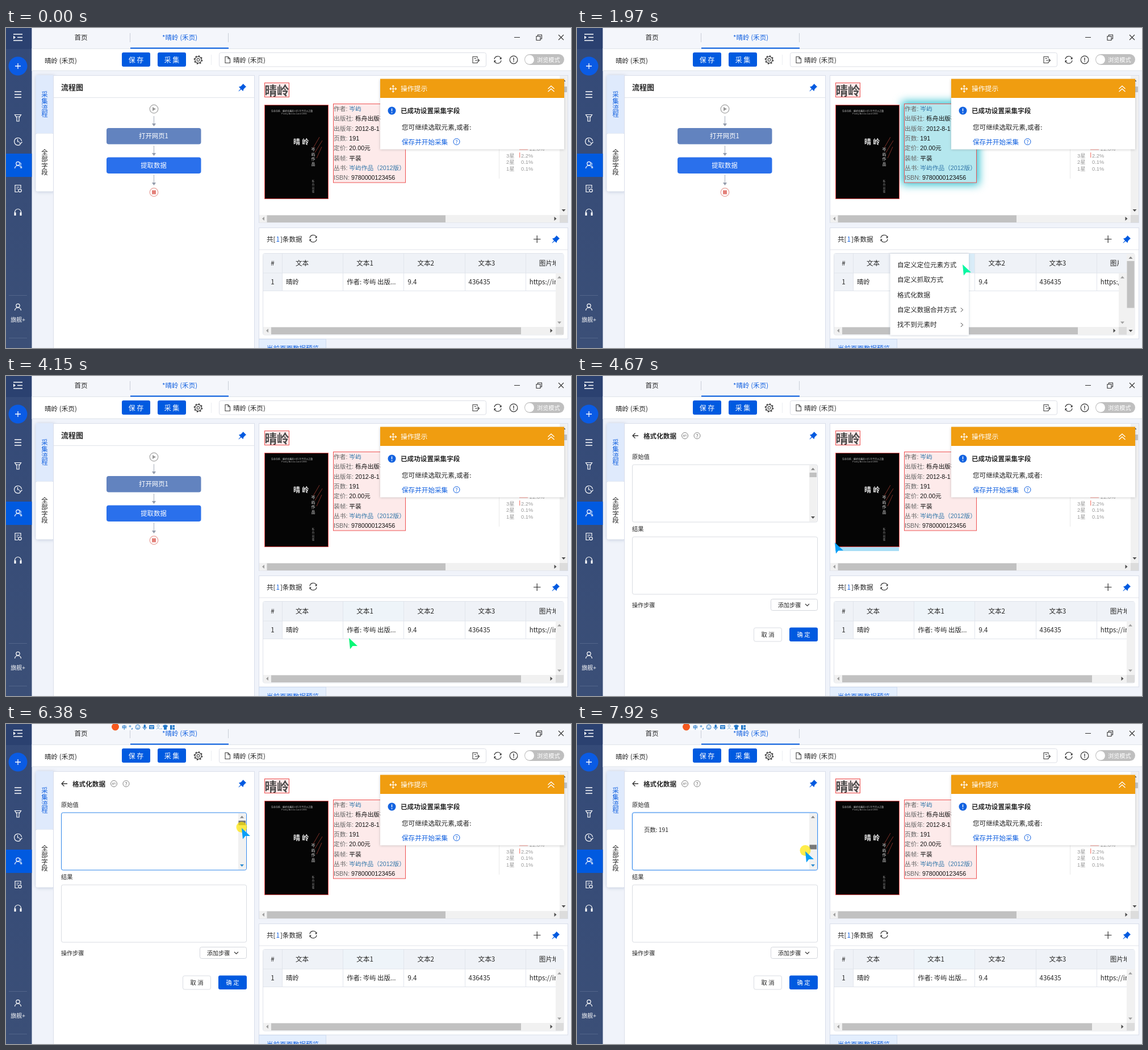
Recreate the animation shown at these times as an HTML page. Size 995 by 563 pixels, loop 8 s.

```html
<!DOCTYPE html>
<html lang="zh">
<head>
<meta charset="utf-8">
<title>流程演示</title>
<style>
html, body { margin: 0; width: 100%; height: 100%; overflow: hidden; background: #f0f3fa; }
svg { display: block; }
text { font-family: "Noto Sans CJK SC", "Noto Sans CJK", sans-serif; white-space: pre; }
.page text { font-family: "Liberation Sans", "Noto Sans CJK SC", "Noto Sans CJK", sans-serif; }
</style>
</head>
<body>
<svg id="stage" width="995" height="563" viewBox="0 0 995 563"></svg>
<script>
const LOOP = 8000, BLUE = '#005ae0', INK = '#262626', LINE = '#dcdfe6';
const BOOK = '晴岭', SITE = '禾页', AUTHOR = '岑屿';
const NAME = `${BOOK} (${SITE})`;

// Drawing helpers
const rect = (x, y, w, h, fill, more = '') => `<rect x="${x}" y="${y}" width="${w}" height="${h}" fill="${fill}" ${more}/>`;
const text = (x, y, str, size = 11.6, fill = INK, more = '') => `<text x="${x}" y="${y}" font-size="${size}" fill="${fill}" ${more}>${str}</text>`;
const line = (d, color, width = 1, more = '') => `<path d="${d}" fill="none" stroke="${color}" stroke-width="${width}" ${more}/>`;
const shape = (d, fill) => `<path d="${d}" fill="${fill}"/>`;
const circle = (x, y, r, fill, more = '') => `<circle cx="${x}" cy="${y}" r="${r}" fill="${fill}" ${more}/>`;
const ring = (x, y, r, color, width = 1.2, more = '') => circle(x, y, r, 'none', `stroke="${color}" stroke-width="${width}" ${more}`);
const group = (id, body, more = '') => `<g id="${id}" ${more}>${body}</g>`;
const at = (x, y, body) => `<g transform="translate(${x} ${y})">${body}</g>`;
const outline = (color, r = 0) => `stroke="${color}" rx="${r}"`;
const CENTER = 'text-anchor="middle"', BOLD = 'font-weight="700"';

const triangles = { up: 'M-3.5 2 0-2 3.5 2Z', down: 'M-3.5-2 0 2 3.5-2Z', left: 'M2-3.5-2 0 2 3.5Z', right: 'M-2-3.5 2 0-2 3.5Z' };
const tri = (x, y, dir, color = '#505050') => at(x, y, shape(triangles[dir], color));
const pin = (x, y) => at(x, y, shape('M1.500-7 7-1.500 5.500-.5 2.500 2.500 1.500 6-2 3-6 6.500-6.500 6-3 2-6-1.500-2.500-2.500.5-5.500Z', BLUE));
const refresh = (x, y, c = '#333') => at(x, y, line('M-6-1A6 6 0 0 1 5.500-2.500M6 1A6 6 0 0 1-5.500 2.500', c, 1.2) + shape('M6.500-5V-1H3ZM-6.500 5V1H-3Z', c));
const gear = (x, y) => at(x, y, ring(0, 0, 5.6, '#444', 1.2) + ring(0, 0, 6.9, '#444', 1.8, 'stroke-dasharray="2.710"') + ring(0, 0, 2.4, '#444', 1.1));
const user = (x, y) => at(x, y, ring(0, -2.5, 3.2, '#fff') + line('M-5.5 6C-5 2-3 1 0 1S5 2 5.5 6', '#fff', 1.2));
const flowArrow = (y, h) => line(`M260.5 ${y}V${y + h - 5}`, '#a9b0bb') + shape(`M257 ${y + h - 5}H264L260.5 ${y + h}Z`, '#949cab');

function sidebar() {
  const w = '#fff';
  return rect(0, 0, 45.5, 563, 'url(#side)') + rect(0, 0, 45.5, 37, '#2b4170') +
    line('M13 11H29M20 16.5H29M13 22H29', w, 1.6) + shape('M13 13.5 17 16.5 13 19.5Z', w) +
    circle(21, 67, 16.5, '#0a5be4') + line('M16 67H26M21 62V72', w, 1.3) +
    line('M15 112H27M15 117H27M15 122H27', w, 1.3) +
    line('M15.5 152.5H26.5L23 158V164H19V158ZM17 156H25', w, 1.2) +
    line('M25.500 204.500A6.500 6.500 0 1 1 27.500 199', w, 1.2) + line('M20.500 195.500V200H23.500M23.500 201.500 25.500 203.500 28.500 200.500', w, 1.2) +
    rect(0, 221, 45.5, 41, BLUE) + user(21, 241) + line('M25 236.5Q28 239 25.5 241.5Q27.5 243 28 246.5', w) +
    line('M26 282V276.500H16V288.500H21M18.500 280H23.500M18.500 283H21', w, 1.2) + ring(24.5, 286, 2.7, w) +
    line('M15.500 326V324A5.500 5.500 0 0 1 26.500 324V326', w, 1.2) + rect(14.5, 324.5, 3, 5.5, w) + rect(24.5, 324.5, 3, 5.5, w) +
    line('M5 470.5H37M5 545.5H37', '#52658a') + user(21, 491) + text(21, 517, '旗舰+', 10, w, CENTER);
}

function topBars() {
  const button = (x, label) => rect(x, 43, 50, 25, BLUE, 'rx="3"') + text(x + 25, 60.5, label, 12, '#fff', CENTER);
  return rect(45.5, 0, 950, 37, '#f4f6fb') + rect(45.5, 37, 950, 38, '#fff') +
    line('M45 36.5H995M45 75H995', '#dfe3ea') + line('M218.5 9V25M391.5 9V25', '#c9ced8') +
    rect(219, 34.5, 173, 2, BLUE) +
    text(132, 21, '首页', 11.6, INK, CENTER) + text(275, 21, '*' + NAME, 11.6, '#1261e0') +
    line('M895 16.500H905M934 14.500H941V21.500H934ZM936.500 14V12H943.500V19H941M973 12 982 21M982 12 973 21', '#333', 1.1) +
    text(68, 62, NAME) + button(204, '保 存') + button(267, '采 集') + gear(338.5, 56) +
    line('M361.500 47V65', '#eceef2') + rect(375.5, 43.5, 470, 24.5, '#fff', outline(LINE, 3)) +
    line('M386 50.500H391L394.500 54V61.500H386ZM391 50.500V54H394.500', '#444', 1.1) + text(400, 60.5, NAME) +
    line('M830 53V50.500H822V61.500H830V60M824.500 53.500H828M826 57H833M830.500 54 833.500 57 830.500 60', '#444', 1.1) +
    refresh(866, 56) + ring(894, 56, 6.8, '#333') + line('M894 52V57.500M894 58.500V60', '#333', 1.3) +
    rect(913, 46, 70, 19, '#bfbfbf', 'rx="9.500"') + circle(922, 55.5, 8, '#fff') + text(935, 59.5, '浏览模式', 10.2, '#fff');
}

function leftPanel() {
  const vertical = (str, y, c) => [...str].map((ch, i) => text(68, y + i * 11.8, ch, 11.4, c, CENTER)).join('');
  const node = (y, label, c) => rect(177, y, 166.5, 28.5, c, 'rx="4"') + text(260, y + 18.2, label, 11.4, '#fff', CENTER);
  const box = (y, id) => rect(97.5, y, 326, 101, '#fff', `id="${id}" ` + outline('#d9dce2', 3));
  const flow = text(97, 108.5, '流程图', 13, INK, BOLD) + line('M84 122.5H437', '#e1e4ea') +
    ring(260.5, 142.5, 7.3, '#a6a6a6') + shape('M258 139V146L264 142.5Z', '#999') + flowArrow(155, 18) +
    node(176, '打开网页1', '#6283bf') + flowArrow(207, 18) + node(227.5, '提取数据', '#2a70ec') + flowArrow(258, 19) +
    ring(260.5, 289, 7.3, '#e7a09a') + rect(257, 285.5, 7, 7, '#e3817a');
  const format = line('M108 105H98M102.500 100.500 98 105 102.500 109.500', '#333', 1.3) + text(117, 109.5, '格式化数据', 11.6, INK, BOLD) +
    ring(190, 105, 5.5, '#777', 0.9) + text(190, 107, 'API', 4.5, '#666', CENTER) + ring(211.5, 105, 5.5, '#777', 0.9) + text(211.5, 108.5, '?', 9, '#666', CENTER) +
    text(97, 146, '原始值', 10.3) + box(156, 'source') +
    group('content', '', 'clip-path="url(#areaClip)"') +
    rect(409, 157, 13.5, 99, '#f1f1f1') + tri(415.5, 163.5, 'up', '#858585') + group('downArrow', tri(415.5, 249, 'down', 'currentColor')) +
    rect(409.5, 170, 12.5, 8, '#c1c1c1', 'id="thumb"') +
    text(97, 272.5, '结果', 10.3) + box(283, 'result') + text(97, 406.5, '操作步骤', 10.1) +
    rect(341.5, 392.5, 82, 20, '#fff', outline('#d3d6dc', 3)) + text(354, 406.5, '添加步骤', 10.1) + line('M402 401 405.500 404.500 409 401', '#333', 1.1) +
    rect(311.5, 443, 49, 24, '#fff', outline('#d9dce2', 3)) + text(336, 459, '取 消', 10.4, INK, CENTER) +
    rect(374, 442.5, 50, 24.5, BLUE, 'rx="3"') + text(399, 459, '确 定', 10.4, '#fff', CENTER);
  return rect(53, 84, 33, 204, '#8c9cba', 'rx="3" opacity=".55" style="filter:blur(3px)"') +
    rect(52.5, 83, 31.5, 102.5, '#dfeafc') + rect(52.5, 185.5, 31.5, 102, '#fff', 'rx="3"') +
    vertical('采集流程', 121, '#1261e0') + vertical('全部字段', 223, INK) +
    rect(83.5, 83.5, 354, 490, '#fff', outline('#d9deea')) + pin(416, 105) + group('flow', flow) + group('format', format);
}

function browser() {
  const info = [['作者', AUTHOR, 1], ['出版社', '栎舟出版社'], ['出版年', '2012-8-1'], ['页数', '191'], ['定价', '20.00元'],
    ['装帧', '平装'], ['丛书', AUTHOR + '作品（2012版）', 1], ['ISBN', '9780000123456']];
  const rows = info.map(([key, value, link], i) =>
    text(577, 146 + i * 17.3, `${key}: <tspan fill="${link ? '#37a' : '#111'}">${value}</tspan>`, 10.7, '#666')).join('');
  const cover = rect(455, 135, 113, 166, '#050505') + text(467, 148, '生命书系：献给长路的人们·万千灯火之歌', 4, '#ccc') +
    text(485, 152, 'Poetry Across Land 1990', 4, '#aaa') + text(506, 205, BOOK.split('').join(' '), 12, '#eee', BOLD) +
    line('M541 211 552 192M544 219 557 198M547 229 556 209', '#8c352b', 0.9) +
    [...AUTHOR + '作品'].map((ch, i) => text(541, 216 + i * 8.7, ch, 7, '#ddd', CENTER)).join('') +
    [...'栎舟出版'].map((ch, i) => text(541, 271 + i * 6, ch, 4.5, '#999', CENTER)).join('') +
    rect(455.5, 135.5, 112, 165, 'none', 'stroke="#ee5050"');
  const stars = ['3星', '2星', '1星'].map((s, i) =>
    text(881, 227.5 + i * 11.8, s, 9.3, '#999') + text(907, 227.5 + i * 11.8, ['2.2%', '0.1%', '0.1%'][i], 9.3, '#999')).join('');
  const tip = rect(659, 91, 324, 123, '#777', 'opacity=".4" style="filter:blur(2px)"') + rect(659, 89.5, 324, 124, '#fff') +
    rect(659, 89.5, 324, 33.5, '#f09d10') +
    line('M676 107H687.500M681.800 101V113M680 103 681.800 101 683.600 103M680 111 681.800 113 683.600 111M678 105 676 107 678 109M685.500 105 687.500 107 685.500 109', '#fff', 1.1) +
    text(695, 111, '操作提示', 11.8, '#fff') + line('M954.500 107 960 102 965.500 107M954.500 112 960 107 965.500 112', '#fff', 1.3) +
    circle(679.5, 145.5, 7, '#1463e0') + line('M679.500 141.500V146.500M679.500 148V149.700', '#fff', 1.4) +
    text(695, 149.5, '已成功设置采集字段', 11.6, INK, BOLD) + text(697, 179, '您可继续选取元素,或者:', 11.6) +
    text(697, 204.5, '保存并开始采集', 11.6, '#1261e0') + ring(793.5, 200, 5.5, '#1261e0', 1) + text(793.5, 203.5, '?', 9, '#1261e0', CENTER);
  return rect(445.5, 83.5, 544, 259, '#fff', outline('#d9deea')) +
    group('glow', rect(572, 129, 136, 147, '#2fc0cf', 'style="filter:blur(7.500px)"')) +
    `<g class="page">` + rect(455.5, 96.5, 43, 25, '#fdeaea', 'stroke="#ee5050"') + text(455.5, 117.5, BOOK, 21.6, '#494949', BOLD) +
    group('imageHover', rect(455, 135, 112, 173, '#a9def5')) + cover +
    rect(576.5, 133.5, 127, 138.5, '#fdeaea', 'id="info" stroke="#ee5050"') + rows +
    line('M868.500 213V265', '#eaeaea') + rect(904, 208, 15, 6.5, '#f58a80') + text(922, 215.5, '22.8%', 9.3, '#999') + rect(904, 219, 1.3, 9, '#f58a80') + stars + '</g>' +
    rect(975, 84, 14, 245, '#f1f1f1') + rect(976, 103, 12, 10, '#c1c1c1') + tri(982, 92, 'up') + tri(982, 321, 'down') +
    rect(446, 329, 529, 13.5, '#f1f1f1') + rect(975, 329, 14, 13.5, '#dcdcdc') + rect(459.5, 329.5, 314.5, 12.5, '#c1c1c1') +
    tri(453, 335.5, 'left', '#a0a0a0') + tri(967.5, 335.5, 'right') + tip;
}

function dataPanel() {
  const heads = ['文本', '文本1', '文本2', '文本3', '图片地址'], cells = [BOOK, `作者: ${AUTHOR} 出版...`, '9.4', '436435', 'https://img1'];
  const labels = heads.map((h, i) => text(510 + i * 107.2, 418, h) + text(493 + i * 107.2, 451, cells[i], 11.4)).join('');
  const bars = (edge, thumbEnd) => rect(edge, 431, 14, 95, '#f1f1f1') + tri(edge + 6.5, 438.5, 'up', '#a0a0a0') + tri(edge + 6.5, 518.5, 'down', '#a0a0a0') +
    rect(453, 526, edge - 453, 13.5, '#f1f1f1') + rect(edge, 526, 14, 13.5, '#dcdcdc') + rect(467, 526.5, thumbEnd - 467, 12.5, '#c1c1c1') +
    tri(460, 532.5, 'left', '#a0a0a0') + tri(edge - 7.5, 532.5, 'right');
  const items = ['自定义定位元素方式', '自定义抓取方式', '格式化数据', '自定义数据合并方式', '找不到元素时'];
  const menu = rect(551, 397, 139, 144, '#8090a5', 'opacity=".4" style="filter:blur(2px)"') + rect(551.5, 397, 138.5, 143.5, '#fff') +
    rect(551.5, 403, 138.5, 26.5, '#e6f3fc', 'id="menuHover"') +
    items.map((s, i) => text(564, 420.7 + i * 26.4, s) + (i > 2 ? line(`M676 ${413.2 + i * 26.4}l3.500 3.500-3.500 3.500`, '#333') : '')).join('');
  return rect(445.5, 351.5, 544, 195.5, '#fff', outline('#d9deea')) + line('M446 390H989', '#e1e4ea') +
    text(459, 375.5, '共[<tspan fill="#1261e0" dx="1">1</tspan><tspan dx="1">]条数据</tspan>', 11.6) + refresh(541, 370.5) +
    line('M929 371.500H941.500M935.200 365V378', '#333', 1.2) + pin(968, 372) +
    rect(452.5, 396.5, 529.5, 143.5, '#fff', outline('#dfe3ea', 3)) + rect(453, 397, 529, 34, '#eff2f7') + rect(453, 431, 33, 31, '#eff2f7') +
    rect(487, 431, 481, 31, '#f4f8fd', 'id="rowHover"') + rect(593, 397, 107, 34, '#fff', 'id="columnHover"') +
    line('M453 431H968M453 462.500H968', '#e1e5ec') + line([486, 593, 700, 808, 915].map(x => `M${x + .5} 397V462`).join(''), '#e1e5ec') +
    text(469.5, 418, '#', 11.6, INK, CENTER) + text(469.5, 451, '1', 11.6, INK, CENTER) +
    `<g clip-path="url(#tableClip)">${labels}</g>` + group('wideBars', bars(968, 907)) +
    group('menuLayer', bars(954, 882) + rect(968, 397, 14, 143, '#f1f1f1') + rect(968.5, 410, 13, 82.5, '#c1c1c1') + tri(975, 404, 'up', '#858585') + tri(975, 533, 'down') + menu) +
    rect(445.5, 547.5, 118, 20, '#e3eefd', 'stroke="#cfdcf0"') + text(459, 568, '当前页面数据预览', 11.5, '#1261e0');
}

function inputBar() {
  const c = '#2277c8';
  return rect(186, 0, 113, 11, '#fbfcfe') + circle(192.5, 5, 6.5, '#f4581e') + text(204, 9, '中', 8.5, c, BOLD) +
    ring(218.5, 4, 1.3, c, 1) + line('M222.500 7 221.500 10', c, 1.3) + ring(232, 5.5, 4, c, 1) + line('M230 6.500Q232 9 234 6.500M230.500 4V5M233.500 4V5', c) +
    rect(242.5, 1, 3.5, 6, c, 'rx="1.700"') + line('M241 5Q241 8.500 244.200 8.500T247.500 5M244.200 8.500V10.500', c) +
    rect(252, 2, 9, 7, c, 'rx="1"') + line('M253 4.500H260M254 7H259', '#fff') + ring(268, 3.5, 2, '#7fb0dc', 1) + line('M265 9.500Q268 5 271 9.500M272 8.500H275', '#7fb0dc') +
    shape('M276 3 279 1.500H282L285 3 284 5.500H283V10H278V5.500H277Z', c) + rect(289, 2, 3.5, 8, c) + rect(293.5, 2, 3.5, 3.5, c) + rect(293.5, 6.5, 3.5, 3.5, c);
}

const svg = document.getElementById('stage');
svg.innerHTML = `<defs><linearGradient id="side" x2="0" y2="1"><stop stop-color="#344a78"/><stop offset="1" stop-color="#3b4f77"/></linearGradient>
  <clipPath id="areaClip">${rect(98, 157, 311, 99, '#000')}</clipPath>
  <clipPath id="tableClip">${rect(453, 397, 515, 143, '#000', 'id="tableView"')}</clipPath></defs>` +
  rect(0, 0, 995, 563, '#f0f3fa') + leftPanel() + sidebar() + topBars() + browser() + dataPanel() + group('inputBar', inputBar()) +
  circle(0, -1.5, 9.5, '#ffe600', 'id="press" opacity=".7"') + `<path id="arrow" d="M0 0 15 14 6.500 14 2 19.500Z"/>` +
  group('beam', line('M-6-10H6M-6 10H6M0-10V10', '#7c8590', 6) + line('M-5.500-10H5.500M-5.500 10H5.500M0-10V10', '#62b4e8', 3));

const $ = id => document.getElementById(id);
const set = (id, attrs) => Object.entries(attrs).forEach(([k, v]) => $(id).setAttribute(k, v));
const show = (id, on) => set(id, { visibility: on ? 'visible' : 'hidden' });

// Scrolled text, placed by distance from the top of the text area
const lines = [['作者:', 132], [AUTHOR, 176], ['出版社:', 286], ['栎舟出版社', 308], ['出版年: 2012-8-1', 430], ['页数: 191', 559], ['定价: 20.00元', 690]];
$('content').innerHTML = group('scroll', lines.map(([s, y]) => text(118, 156 + y, s, 10.3)).join(''));

// Bursts of picture changes: start, end, count
const bursts = [[70, 830, 8], [950, 1710, 8], [1840, 1970, 2], [2110, 2860, 8], [2960, 3670, 8], [3860, 4400, 6],
  [4540, 5310, 8], [5410, 5890, 6], [6090, 6090, 1], [6280, 7000, 8], [7200, 7920, 8]];
const ticks = bursts.flatMap(([a, b, n]) => Array.from({ length: n }, (_, i) => a + (b - a) * i / (n - 1 || 1)));
const snap = t => ticks.reduce((last, s) => s <= t + 0.5 ? s : last, 0);

const path = [[0, 655, 590], [70, 655, 550], [830, 660, 432], [1710, 679, 407], [1970, 679, 416], [2860, 652, 425], [3670, 614, 466],
  [4400, 596, 457], [4540, 560, 420], [4650, 454, 293], [4870, 403, 210], [5310, 410, 187], [5890, 414, 175], [6090, 415, 178],
  [6280, 415, 183], [7000, 415, 183], [7920, 402, 224]];
const hues = [[0, 195], [1970, 159], [3670, 100], [4540, 202], [8000, 202]];
function sample(keys, t) {
  const i = keys.findIndex(k => k[0] > t);
  if (i < 0) return keys.at(-1).slice(1);
  const a = keys[i - 1], b = keys[i], f = (t - a[0]) / (b[0] - a[0]);
  return a.slice(1).map((v, n) => v + (b[n + 1] - v) * f);
}

function render(time) {
  const t = snap(time), within = (a, b) => t >= a && t < b;
  const [x, y] = sample(path, t), [hue] = sample(hues, t);
  const menu = within(1900, 3950), format = t >= 4150, drag = Math.max(0, (t - 7000) / 920);
  const inArea = within(4800, 5150), focus = Math.min(1, Math.max(0, (t - 6280) / 400));

  show('flow', !format);
  show('format', format);
  show('menuLayer', menu);
  show('wideBars', !menu);
  show('glow', menu);
  set('info', { fill: menu ? '#b5e7ee' : '#fdeaea' });
  set('tableView', { width: menu ? 501 : 515 });
  show('rowHover', within(400, 1000));
  const deep = within(2100, 3950);
  set('columnHover', { fill: deep ? '#a1cdee' : t >= 3950 ? '#eef4f9' : '#d9ecf8', height: deep ? 65 : 34 });
  show('columnHover', t > 1050);
  const item = Math.floor((y - 403) / 26.4);
  show('menuHover', menu && t > 2100);
  set('menuHover', { y: 403 + item * 26.4 });
  show('imageHover', within(4600, 4750));

  set('source', { stroke: t >= 6280 ? '#2f86ea' : t >= 4800 ? '#8db6ea' : '#d9dce2' });
  $('source').style.filter = focus ? `drop-shadow(0 0 1px rgba(24,120,255,${focus * 0.35}))` : '';
  $('downArrow').style.color = t >= 4800 ? '#2b8ad0' : '#505050';
  set('thumb', { y: 170 + drag * 42.5, fill: t >= 6280 ? '#787878' : t >= 5400 ? '#a8a8a8' : '#c1c1c1' });
  set('scroll', { transform: `translate(0 ${-drag * 525})` });
  show('inputBar', t >= 6280);

  const move = { transform: `translate(${x} ${y})` };
  ['arrow', 'beam', 'press'].forEach(id => set(id, move));
  set('arrow', { fill: `hsl(${hue} 94% 50%)` });
  show('arrow', t > 0 && !inArea);
  show('beam', inArea);
  show('press', t >= 6280 || within(3850, 3950));
}

const start = performance.now();
function frame() {
  render((performance.now() - start) % LOOP);
  requestAnimationFrame(frame);
}
render(0);
requestAnimationFrame(frame);
</script>
</body>
</html>
```
